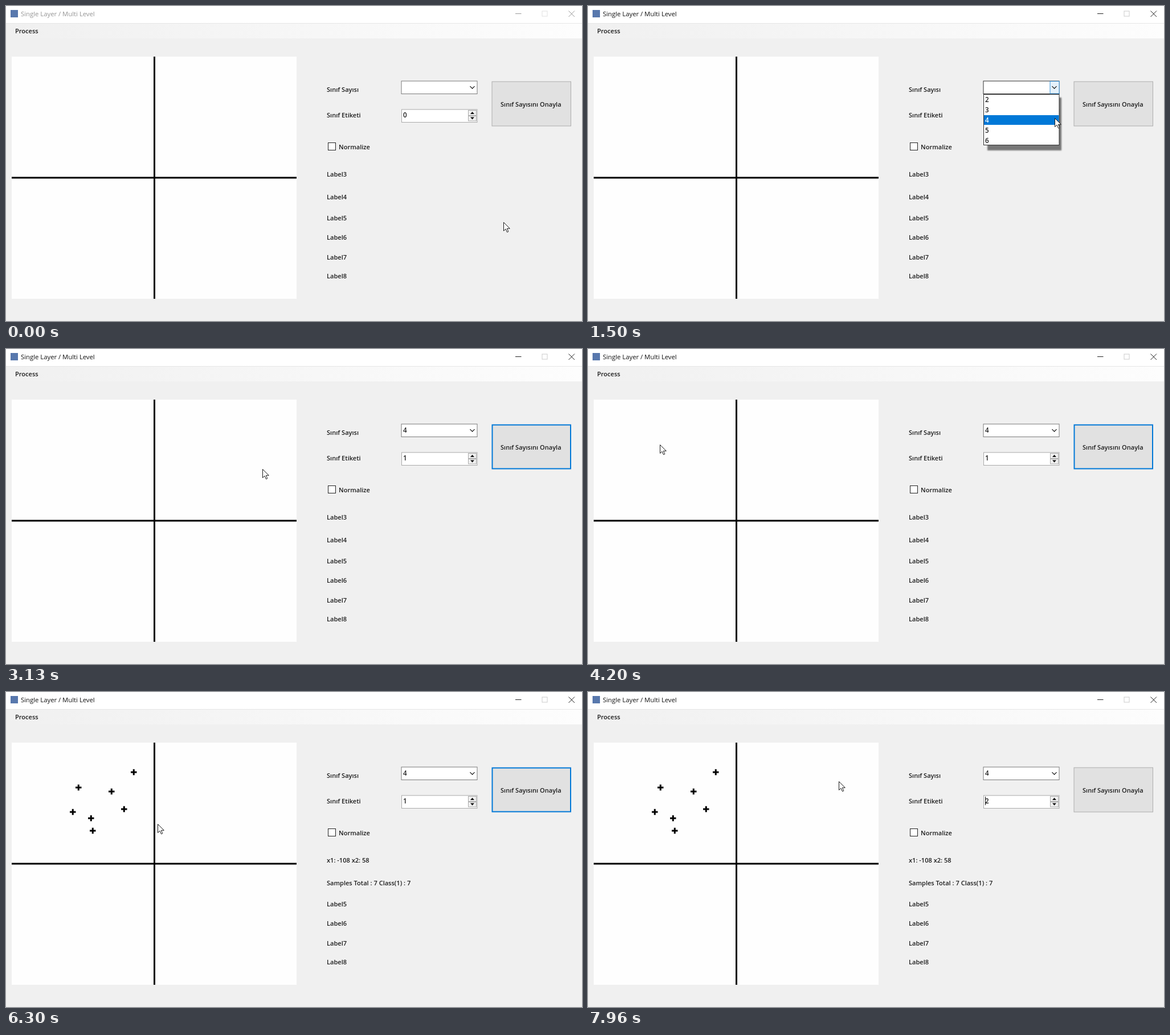
Animation of 1011x554 px, one loop 8 s. Source, as an HTML page:

```html
<!DOCTYPE html>
<html lang="tr">
<head>
<meta charset="utf-8">
<title>Single Layer / Multi Level</title>
<style>
html, body { margin: 0; width: 100%; height: 100%; overflow: hidden; background: #f0f0f0; }
svg { display: block; width: 100vw; height: 100vh; }
text { font: 600 11.05px "Open Sans", "Noto Sans", sans-serif; fill: #1c1c1c; white-space: pre; }
.title { font-weight: 400; font-size: 11.3px; }
.num { font-size: 11.6px; }
.line { fill: none; stroke: #111; }
</style>
</head>
<body>
<svg id="stage" viewBox="0 0 1011 554" xmlns="http://www.w3.org/2000/svg">
  <defs>
    <linearGradient id="strip"><stop offset="0" stop-color="#f0f0f0"/><stop offset="1" stop-color="#fdfdfd"/></linearGradient>
    <filter id="soft" x="-10%" y="-100%" width="120%" height="300%"><feGaussianBlur stdDeviation="0.9"/></filter>
    <clipPath id="drop"><rect id="dropClip" x="693" y="155" width="136" height="0"/></clipPath>
  </defs>
  <rect width="1011" height="554" fill="#f0f0f0"/>
  <rect width="1011" height="30" fill="#fff"/>
  <rect y="30" width="1011" height="1" fill="#e6e6e6"/>
  <rect y="31" width="1011" height="26" fill="url(#strip)"/>
  <rect x="8" y="7" width="13" height="13" fill="#5878ad"/>
  <text id="title" class="title" x="26" y="18">Single Layer / Multi Level</text>
  <path id="minClose" class="line" d="M894 13.5H904.500M987.500 8.500L998 19M998 8.500L987.500 19"/>
  <rect id="maxBox" class="line" x="941" y="9" width="9" height="9"/>

  <rect x="10" y="89" width="500" height="426" fill="#fefefe"/>
  <path d="M260.500 89V515M10 302H510" stroke="#000" stroke-width="3"/>
  <g id="marks" stroke="#000" stroke-width="3"></g>
  <g id="labels"></g>

  <rect x="565.500" y="240.500" width="13" height="13" fill="#fff" stroke="#222"/>

  <rect id="combo" x="694" y="132" width="133" height="22.500" fill="#fff"/>
  <rect id="comboBtn" x="811" y="132.500" width="16" height="21.500"/>
  <path id="chevron" class="line" d="M814.500 141.200L818.500 145.200L822.500 141.200" stroke-width="1.2"/>
  <rect id="comboSel" x="696" y="135" width="8.500" height="15" fill="#0078d7"/>
  <text id="comboText" class="num" x="697" y="147">4</text>
  <path id="comboCaret" class="line" d="M697.500 135V150"/>

  <rect x="694.500" y="182" width="132.500" height="22.500" fill="#fff" stroke="#a9a9a9"/>
  <rect id="spinUp" x="811.500" y="183.500" width="14" height="9"/>
  <rect x="811.500" y="193.500" width="14" height="8.500" fill="#f0f0f0" stroke="#acacac"/>
  <path d="M815 190L818.500 186L822 190ZM815 195.500L818.500 199.500L822 195.500Z" fill="#111"/>
  <text id="spinText" class="num" x="697" y="196">0</text>
  <path id="spinCaret" class="line" d="M697.500 184V199"/>

  <rect id="ok"/>
  <text x="868" y="176.500">Sınıf Sayısını Onayla</text>

  <rect id="shadow" x="701" y="161" width="130" fill="#000" opacity=".5" filter="url(#soft)"/>
  <g clip-path="url(#drop)"><g id="list"></g></g>

  <path id="cursor" d="M.5 .5V15.500L4 12.200L6.500 17.800L8.800 16.800L6.400 11.300H11.300Z" fill="#fff" stroke="#1a1a1a" stroke-linejoin="round"/>
</svg>
<script>
const LOOP = 8000, ROW = 18, LIST_H = 5 * ROW;
const OPEN = 930, PICK = 2230, CONFIRM = 2830, STEP_UP = 7430;
const $ = id => document.getElementById(id);
const set = (el, attrs) => { for (const k in attrs) el.setAttribute(k, attrs[k]); };
const show = (id, on) => set($(id), { visibility: on ? 'visible' : 'hidden' });
const clamp = v => Math.max(0, Math.min(1, v));

function add(parent, tag, attrs, text) {
  const el = document.createElementNS('http://www.w3.org/2000/svg', tag);
  set(el, attrs);
  if (text !== undefined) el.textContent = text;
  return $(parent).appendChild(el);
}

// time, x, y of the pointer tip; equal neighbours are rests
const path = `0 873 380|100 873 380|400 856 275|700 830 158|800 827 147|930 827 147
|1120 822 172|1300 819 196|1460 819 196|1600 818 201|1830 818 201|2000 816 205|2230 816 205
|2330 845 188|2430 877 170|2630 882 172|2860 882 172|3060 600 207|3280 125 210|3380 85 203
|3460 93 194|3630 93 194|3850 112 177|4030 126 168|4230 126 168|4400 110 200|4500 117 211
|4600 117 211|4760 149 222|4930 149 222|5130 173 184|5230 185 175|5290 185 175|5470 224 141
|5530 224 141|5700 209 198|5780 207 206|5850 207 206|6040 152 244|6130 152 244|6300 265 232
|6420 450 195|6530 651 168|6720 836 177|6900 830 183|7260 817 186|7500 817 186|7700 640 168
|7960 440 157|8000 440 157`.split('|').map(s => s.trim().split(' ').map(Number));

// click time, x, y of each sample
const samples = [
  [4230, 127, 168], [4560, 117, 211], [4900, 149, 222], [5260, 185, 175],
  [5500, 224, 141], [5820, 207, 206], [6090, 152, 244]
];

const same = (a, b) => a[1] === b[1] && a[2] === b[2];
function slope(i, k) {
  const a = path[i - 1], b = path[i], c = path[i + 1];
  if (!a || !c || same(a, b) || same(b, c)) return 0;
  return (c[k] - a[k]) / (c[0] - a[0]);
}

function pointer(t) {
  let i = 0;
  while (i < path.length - 2 && t >= path[i + 1][0]) i++;
  const a = path[i], b = path[i + 1], span = b[0] - a[0], u = (t - a[0]) / span;
  const h = u * u * (3 - 2 * u);
  return [1, 2].map(k => Math.round(
    a[k] * (1 - h) + b[k] * h
    + span * (slope(i, k) * u * (1 - u) * (1 - u) - slope(i + 1, k) * u * u * (1 - u))));
}

const mix = (a, b, u) => `rgb(${a.map((v, i) => Math.round(v + (b[i] - v) * u))})`;

add('labels', 'text', { x: 16, y: 48 }, 'Process');
add('labels', 'text', { x: 563, y: 151 }, 'Sınıf Sayısı');
add('labels', 'text', { x: 563, y: 196 }, 'Sınıf Etiketi');
add('labels', 'text', { x: 584, y: 251.5 }, 'Normalize');
const info = [299.5, 339.5, 376.5, 410.5, 445.5, 478.5].map((y, i) =>
  add('labels', 'text', { x: 563, y }, 'Label' + (i + 3)));

const marks = samples.map(([, x, y]) =>
  add('marks', 'path', { d: `M${x - 5} ${y}h10.500M${x + .25} ${y - 5.25}v10.500` }));

add('list', 'rect', { x: 694.5, y: 155.5, width: 132.5, height: LIST_H - 1, fill: '#fff', stroke: '#333' });
const bar = add('list', 'rect', { x: 695, width: 131.5, height: ROW - 1, fill: '#0078d7' });
const rows = [2, 3, 4, 5, 6].map((n, i) =>
  add('list', 'text', { class: 'num', x: 697, y: 168.5 + i * ROW }, n));

function drawCombo(t, y) {
  const hot = t >= 760 && t < CONFIRM, open = t >= OPEN && t < PICK, picked = t >= PICK;
  const focus = picked && hot;
  set($('combo'), { stroke: focus ? '#0078d7' : hot ? '#333' : '#7a7a7a', 'stroke-width': focus ? 1.4 : 1 });
  set($('comboBtn'), {
    fill: hot ? '#e5f1fb' : 'none',
    stroke: !hot ? 'none' : '#3c96dc'
  });
  set($('chevron'), { stroke: hot ? '#333' : '#666' });
  show('comboSel', focus);
  show('comboText', picked);
  $('comboText').style.fill = focus ? '#fff' : '#1c1c1c';
  show('comboCaret', t >= 830 && t < PICK && !(t >= 1460 && t < 1960));

  const h = open ? Math.round(LIST_H * clamp((t - OPEN - 20) / 180)) : 0;
  show('shadow', open);
  set($('shadow'), { height: 3 + h });
  set($('dropClip'), { height: h });
  set($('list'), { transform: `translate(0 ${h - LIST_H})` });
  const row = Math.floor((y - 156) / ROW), lit = h === LIST_H && row >= 0 && row < 5;
  set(bar, { y: 156 + row * ROW, visibility: lit ? 'visible' : 'hidden' });
  rows.forEach((el, i) => { el.style.fill = lit && i === row ? '#fff' : '#1c1c1c'; });
}

function drawButton(t) {
  const focus = t >= CONFIRM && t < STEP_UP;
  const glow = clamp((t - 2440) / 160) * (1 - clamp((t - 2930) / 200));
  const pressed = t >= 2800 && t < 2890;
  const w = focus ? 2 : 1;
  set($('ok'), {
    x: 852.5 + w / 2, y: 132.5 + w / 2, width: 139.5 - w, height: 79 - w,
    fill: pressed ? '#cce4f7' : mix([225, 225, 225], [229, 241, 251], glow),
    stroke: focus ? '#0078d7' : mix([173, 173, 173], [0, 120, 215], glow),
    'stroke-width': w
  });
}

function draw(t) {
  const [x, y] = pointer(t), active = t >= 830;
  set($('cursor'), { transform: `translate(${x} ${y})` });
  $('title').style.fill = active ? '#111' : '#949494';
  $('minClose').style.stroke = active ? '#222' : '#999';
  $('maxBox').style.stroke = active ? '#ccc' : '#e2e2e2';

  drawCombo(t, y);
  drawButton(t);

  const hover = x >= 811 && x <= 826 && y >= 183 && y <= 192;
  set($('spinUp'), { fill: hover ? '#e5f1fb' : '#f0f0f0', stroke: hover ? '#0078d7' : '#acacac' });
  $('spinText').textContent = t < CONFIRM ? 0 : t < STEP_UP ? 1 : 2;
  show('spinCaret', t >= STEP_UP);

  const n = samples.filter(s => t >= s[0]).length;
  marks.forEach((el, i) => set(el, { visibility: i < n ? 'visible' : 'hidden' }));
  const last = samples[n - 1];
  info[0].textContent = n ? `x1: ${last[1] - 260} x2: ${302 - last[2]}` : 'Label3';
  info[1].textContent = n ? `Samples Total : ${n} Class(1) : ${n}` : 'Label4';
}

const start = performance.now();
function tick(now) {
  draw(Math.max(0, now - start) % LOOP);
  requestAnimationFrame(tick);
}
draw(0);
requestAnimationFrame(tick);
</script>
</body>
</html>
```
